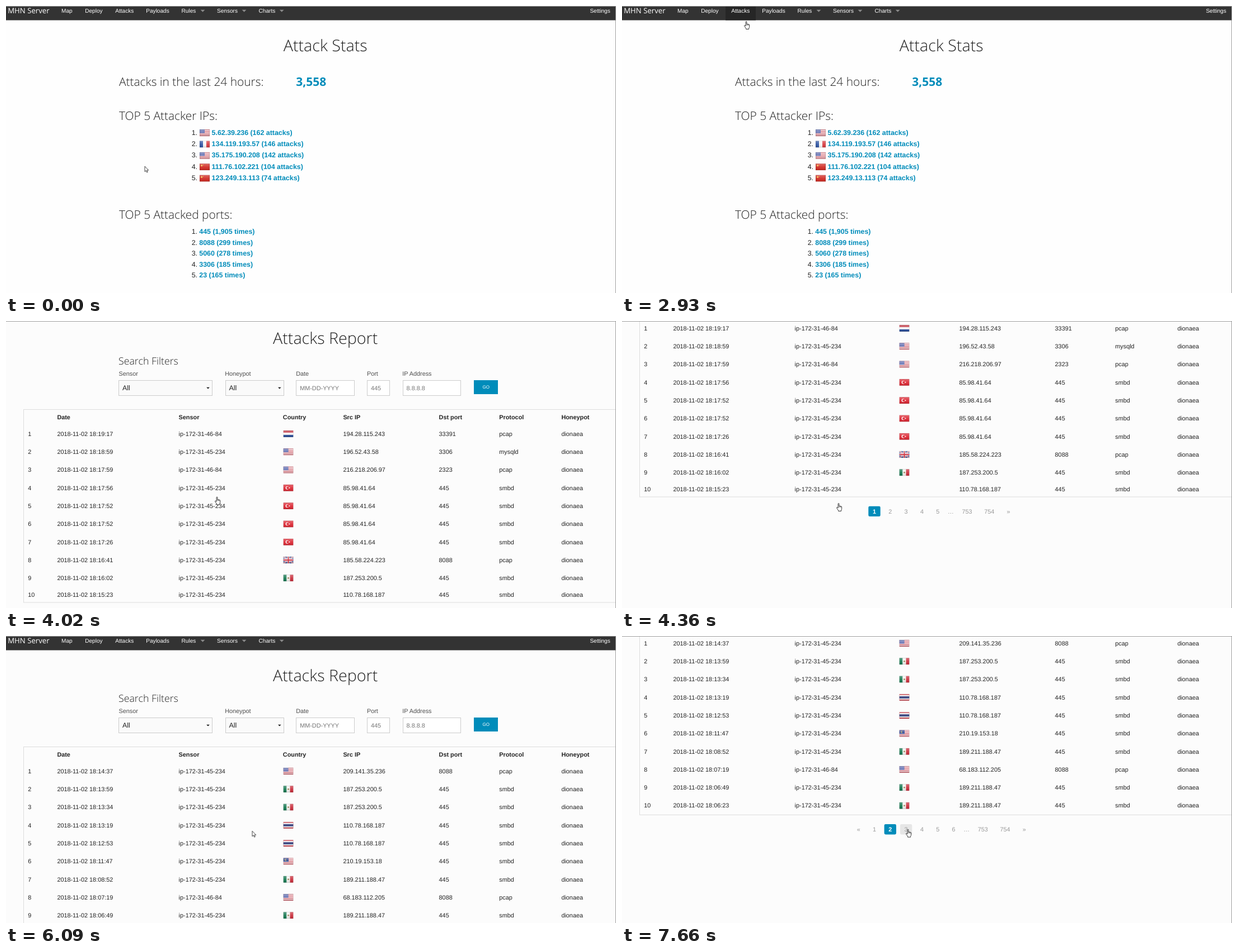
Animation of 1090 by 514 pixels, one loop 8 s. Source, as an HTML page:

```html
<!DOCTYPE html>
<html lang="en">
<head>
<meta charset="utf-8">
<title>Attack reports</title>
<style>
  html, body { margin: 0; width: 100%; height: 100%; overflow: hidden; background: #fefefe; }
  svg { display: block; width: 100%; height: 100%; }
  text { font: 10.85px "Liberation Sans", Arial, sans-serif; fill: #222; text-rendering: geometricPrecision; white-space: pre; }
  .h2, .h3, .h4 { font-family: "Open Sans", sans-serif; font-weight: 300; }
  .h2 { font-size: 28.7px; }
  .h3 { font-size: 20.9px; }
  .h4 { font-size: 17.8px; }
  .total { font: 700 20.9px "Open Sans", sans-serif; fill: #008cba; }
  .brand { font: 13.2px "Open Sans", sans-serif; fill: #fff; }
  .nav { font-size: 10.07px; fill: #fff; }
  .item { font-size: 12.4px; }
  .link { font-size: 12.4px; font-weight: 700; fill: #008cba; }
  .th { font-weight: 700; }
  .label { fill: #4d4d4d; }
  .hint { fill: #757575; }
  .go { font-size: 8px; fill: #fff; }
  .page { fill: #999; }
  .current { fill: #fff; font-weight: 700; }
  .mid { text-anchor: middle; }
  .end { text-anchor: end; }
  .field { fill: #fff; stroke: #ccc; }
  .pick { fill: #fafafa; stroke: #ccc; }
</style>
</head>
<body>
<svg viewBox="0 0 1090 514" xmlns="http://www.w3.org/2000/svg">
  <defs>
    <linearGradient id="gloss" x2="0" y2="1">
      <stop offset="0" stop-color="#fff" stop-opacity=".32"/>
      <stop offset=".55" stop-color="#fff" stop-opacity=".08"/>
      <stop offset="1" stop-color="#000" stop-opacity=".12"/>
    </linearGradient>
    <g id="arrow"><path d="M.5.6V10.2L2.7 8.2 4.2 11.5 5.8 10.8 4.3 7.6H7.2Z" fill="#fff" stroke="#333" stroke-width=".9"/></g>
    <g id="hand">
      <path d="M3.1 9V1.6Q3.1.6 4 .6T4.9 1.6V5.2Q5.8 4.6 6.5 5.5 7.4 5 8 5.9 9.6 5.6 9.6 7.2V10.4Q9.5 12 8.6 13V14.5H3.6V13.2L.9 9.3Q.1 8.1 1 7.6T3.1 9Z" fill="#fff" stroke="#222" stroke-width=".9"/>
      <path d="M4.9 5.2V7.6M6.5 5.5V7.7M8 5.9V7.8" stroke="#222" stroke-width=".7" fill="none"/>
    </g>
  </defs>
  <rect id="paper" width="1090" height="514"/>
  <g id="view"></g>
  <path d="M0 .5H1090M1089.5 0V514" stroke="#a0a0a0"/>
  <use id="cursor"/>
</svg>
<script>
const $ = id => document.getElementById(id);
const LOOP = 8000, BLUE = '#008cba';

const text = (x, y, s, cls = '') => `<text x="${x}" y="${y}" class="${cls}">${s}</text>`;
const rect = (x, y, w, h, fill, more = '') =>
  `<rect x="${x}" y="${y}" width="${w}" height="${h}" fill="${fill}" ${more}/>`;
const field = (x, w, cls) => `<rect x="${x + .5}" y="106.5" width="${w}" height="27" class="${cls}"/>`;
const caret = (x, y, r, fill) => `<path d="M${x - r} ${y}h${2 * r}l${-r} ${r}z" fill="${fill}"/>`;
const bands = (...c) => c.map((k, i) => rect(0, i * 12 / c.length, 18, 12 / c.length, k)).join('');
const posts = (...c) => c.map((k, i) => rect(i * 6, 0, 6, 12, k)).join('');
const stripes = n => bands(...Array.from({ length: n }, (_, i) => i % 2 ? '#f4eef0' : '#cf4351'));
const thai = c => rect(0, 0, 18, 12, c) + rect(0, 2, 18, 8, '#f5f5f8') + rect(0, 4, 18, 4, '#2d3a78');

const flags = {
  us: stripes(9) + rect(0, 0, 9, 6.6, '#4a5aa6') +
    '<path d="M1 1.5H8.5M1 3.3H8.5M1 5.1H8.5" stroke="#cdd2ea" stroke-width=".7" stroke-dasharray=".8 1"/>',
  fr: posts('#2c53a3', '#f7f7f7', '#d93b40'),
  cn: rect(0, 0, 18, 12, '#d0271f') + '<circle cx="3.6" cy="3.6" r="1.5" fill="#f4c343"/><circle cx="6.5" cy="2.5" r=".6" fill="#f4c343"/>',
  nl: bands('#c23340', '#f5f5f5', '#2b4f9c'),
  tr: rect(0, 0, 18, 12, '#dc2430') + '<circle cx="7" cy="6" r="2.9" fill="#fff"/><circle cx="7.9" cy="6" r="2.3" fill="#dc2430"/><circle cx="11" cy="6" r="1" fill="#fff"/>',
  gb: rect(0, 0, 18, 12, '#2f4a93') +
    '<path d="M0 0L18 12M18 0L0 12" stroke="#f0f0f5" stroke-width="2.4"/><path d="M0 0L18 12M18 0L0 12" stroke="#cf3340" stroke-width=".9"/>' +
    '<path d="M9 0V12M0 6H18" stroke="#f5f5f8" stroke-width="4"/><path d="M9 0V12M0 6H18" stroke="#cf2f3c" stroke-width="2.2"/>',
  mx: posts('#12764e', '#f4f4f2', '#c92a38') + '<circle cx="9" cy="6" r="1.5" fill="#9a8257"/>',
  th: thai('#cf3a45'),
  my: stripes(9) + rect(0, 0, 9.5, 6.8, '#27408f') + '<circle cx="4.5" cy="3.4" r="1.9" fill="#eecb4d"/><circle cx="5.2" cy="3.4" r="1.4" fill="#27408f"/>'
};
const flag = (x, y, id) => `<svg x="${x}" y="${y}" width="18" height="12">${flags[id]}` +
  rect(0, 0, 18, 12, 'url(#gloss)') + rect(.25, .25, 17.5, 11.5, 'none', 'stroke="#000" stroke-opacity=".28" stroke-width=".5"') + '</svg>';

const attackers = ['us 5.62.39.236 (162', 'fr 134.119.193.57 (146', 'us 35.175.190.208 (142', 'cn 111.76.102.221 (104', 'cn 123.249.13.113 (74'];
const ports = ['445 (1,905', '8088 (299', '5060 (278', '3306 (185', '23 (165'];
const reports = [null, `
19:17 46-84 nl 194.28.115.243 33391 pcap
18:59 45-234 us 196.52.43.58 3306 mysqld
17:59 46-84 us 216.218.206.97 2323 pcap
17:56 45-234 tr 85.98.41.64 445 smbd
17:52 45-234 tr 85.98.41.64 445 smbd
17:52 45-234 tr 85.98.41.64 445 smbd
17:26 45-234 tr 85.98.41.64 445 smbd
16:41 45-234 gb 185.58.224.223 8088 pcap
16:02 45-234 mx 187.253.200.5 445 smbd
15:23 45-234 th 110.78.168.187 445 smbd`, `
14:37 45-234 us 209.141.35.236 8088 pcap
13:59 45-234 mx 187.253.200.5 445 smbd
13:34 45-234 mx 187.253.200.5 445 smbd
13:19 45-234 th 110.78.168.187 445 smbd
12:53 45-234 th 110.78.168.187 445 smbd
11:47 45-234 my 210.19.153.18 445 smbd
08:52 45-234 mx 189.211.188.47 445 smbd
07:19 46-84 us 68.183.112.205 8088 pcap
06:49 45-234 mx 189.211.188.47 445 smbd
06:23 45-234 mx 189.211.188.47 445 smbd`];
const pagers = [null,
  { 1: 451, 2: 479.3, 3: 507.6, 4: 536, 5: 564.2, '…': 587.5, 753: 616.5, 754: 656.3, '»': 690.5 },
  { '«': 422.7, 1: 451, 2: 479.3, 3: 507.6, 4: 536, 5: 564.2, 6: 592.4, '…': 615.7, 753: 644.7, 754: 684.6, '»': 718.8 }];

function navBar(hot) {
  const items = { Map: 99, Deploy: 141.2, Attacks: 195.3, Payloads: 250.3, Rules: 313.6, Sensors: 377, Charts: 451.6, Settings: 1043.4 };
  return rect(0, 0, 1090, 25.5, '#333') + (hot ? rect(185, 0, 54, 25.5, '#262626') : '') +
    text(3.2, 13.2, 'MHN Server', 'brand') +
    Object.entries(items).map(([s, x]) => text(x, 12.2, s, 'nav')).join('') +
    [351.5, 425.5, 492.7].map(x => caret(x, 6.8, 3.9, '#8c8c8c')).join('');
}

function stats(hot) {
  const ips = attackers.map((s, i) => {
    const y = 230.6 + i * 20.4;
    return text(342, y, i + 1 + '.', 'item end') + flag(346, y - 9.6, s.slice(0, 2)) +
      text(367.6, y, s.slice(3) + ' attacks)', 'link');
  });
  const hits = ports.map((s, i) => {
    const y = 408.2 + i * 19.45;
    return text(342, y, i + 1 + '.', 'item end') + text(345.3, y, s + ' times)', 'link');
  });
  return navBar(hot) + text(570.7, 81, 'Attack Stats', 'h2 mid') +
    text(202, 143, 'Attacks in the last 24 hours:', 'h3') + text(518.3, 143, '3,558', 'total') +
    text(202, 203.5, 'TOP 5 Attacker IPs:', 'h3') + ips.join('') +
    text(202, 381, 'TOP 5 Attacked ports:', 'h3') + hits.join('');
}

function filters() {
  const labels = { Sensor: 201.5, Honeypot: 391.2, Date: 518.2, Port: 645, 'IP Address': 708.3 };
  return text(570.7, 41.2, 'Attacks Report', 'h2 mid') + text(201, 78.2, 'Search Filters', 'h4') +
    Object.entries(labels).map(([s, x]) => text(x, 98, s, 'label')).join('') +
    field(201, 167, 'pick') + field(392, 104, 'pick') +
    text(208, 124, 'All', 'item') + text(398.5, 124, 'All', 'item') +
    caret(361, 118.8, 2.8, '#111') + caret(488.8, 118.8, 2.8, '#111') +
    field(518, 104, 'field') + field(645, 40, 'field') + field(709, 103, 'field') +
    text(525.2, 123.6, 'MM-DD-YYYY', 'hint') + text(652, 123.6, '445', 'hint') + text(715.6, 123.6, '8.8.8.8', 'hint') +
    rect(836, 106, 43, 25, BLUE) + text(857.8, 121, 'GO', 'go mid');
}

function report({ page, loaded, hover, hot }) {
  const xs = [39.2, 91.4, 308.6, 494.8, 602.4, 773.6, 881.3, 992.4];
  const heads = ['', 'Date', 'Sensor', 'Country', 'Src IP', 'Dst port', 'Protocol', 'Honeypot'];
  let top = 185.8;
  const rows = reports[page].trim().split('\n').map((line, i) => {
    const [time, host, land, ip, port, proto] = line.split(' ');
    const h = i < loaded ? 32.3 : 27, y = top + h / 2;
    top += h;
    const cells = [i + 1, '2018-11-02 18:' + time, 'ip-172-31-' + host, '', ip, port, proto, 'dionaea'];
    return cells.map((s, c) => s === '' ? '' : text(xs[c], y + 3.8, s)).join('') +
      (i < loaded ? flag(495.5, y - 6, land) : '');
  });
  const y = top + 26.4;
  const pager = Object.entries(pagers[page]).map(([s, x]) => {
    const on = s == page, fill = on ? BLUE : s == hover ? '#e6e6e6' : '';
    return (fill ? rect(x - 10.7, y - 9.2, 21.4, 18.4, fill, 'rx="2.4"') : '') +
      text(x, y + 3.8, s, 'mid ' + (on ? 'current' : 'page'));
  });
  return `<g transform="translate(0 -40)">${navBar(hot)}</g>` + filters() +
    rect(31.5, 158.5, 1100, top - 158, 'none', 'stroke="#ddd"') +
    heads.map((s, c) => text(xs[c], 175.7, s, 'th')).join('') + rows.join('') + pager.join('');
}

// Each list is held from its start time until the next entry.
const scenes = [
  [0, { page: 0 }],
  [1750, { page: 0, hot: true }],
  [3050, { page: 1, loaded: 0, hot: true }],
  [3200, { page: 1, loaded: 9, hot: true }],
  [3500, { page: 1, loaded: 9 }],
  [4520, { page: 1, loaded: 10 }],
  [5200, { page: 1, loaded: 10, hover: 2 }],
  [5690, { page: 2, loaded: 10 }],
  [7660, { page: 2, loaded: 10, hover: 3 }]
];
const scrolls = [[0, 0], [4020, 40], [4170, 150], [4360, 229], [5690, 0], [6850, 68], [6980, 141], [7350, 229]];
const pointer = [
  [0, 247.5, 286.5, 'arrow'], [410, 252, 278, 'arrow'], [560, 262, 248, 'arrow'], [705, 266, 205, 'arrow'],
  [850, 264, 160, 'arrow'], [1000, 258, 118, 'arrow'], [1145, 250, 82, 'arrow'], [1290, 242, 55, 'arrow'],
  [1440, 237, 41, 'arrow'], [1600, 229, 32, 'arrow'], [1750, 214, 21, 'hand'], [2930, 218, 27, 'hand'],
  [3500, 246, 72, 'hand'], [3630, 295, 160, 'hand'], [3760, 338, 243, 'hand'], [3890, 364, 295, 'hand'],
  [4020, 373, 314.5, 'hand'], [4170, 379, 322, 'hand'], [4360, 383, 326, 'hand'], [4520, 389, 328, 'hand'],
  [4700, 405, 334, 'hand'], [4830, 428, 340, 'hand'], [4960, 450, 344, 'hand'], [5200, 473, 347, 'hand'],
  [5450, 468, 348, 'hand'], [5570, 455.5, 350, 'hand'], [5690, 442.5, 349, 'arrow'], [5840, 441, 349, 'arrow'],
  [6090, 439.5, 348.7, 'arrow'], [7350, 516, 361, 'arrow'], [7660, 507, 345.7, 'hand']
];
const at = (list, t) => list.findLast(k => k[0] <= t);

let shown;
function draw(t) {
  const scene = at(scenes, t)[1], scroll = at(scrolls, t)[1];
  if (scene !== shown) {
    $('view').innerHTML = scene.page ? report(scene) : stats(scene.hot);
    $('paper').setAttribute('fill', scene.page ? '#fcfcfc' : '#fefefe');
    shown = scene;
  }
  $('view').setAttribute('transform', `translate(0 ${scene.page ? 40 - scroll : 0})`);
  const [, x, y, shape] = at(pointer, t);
  $('cursor').setAttribute('href', '#' + shape);
  $('cursor').setAttribute('transform', `translate(${x} ${y})`);
}

const start = performance.now();
function tick() {
  draw((performance.now() - start) % LOOP);
  requestAnimationFrame(tick);
}
tick();
</script>
</body>
</html>
```
